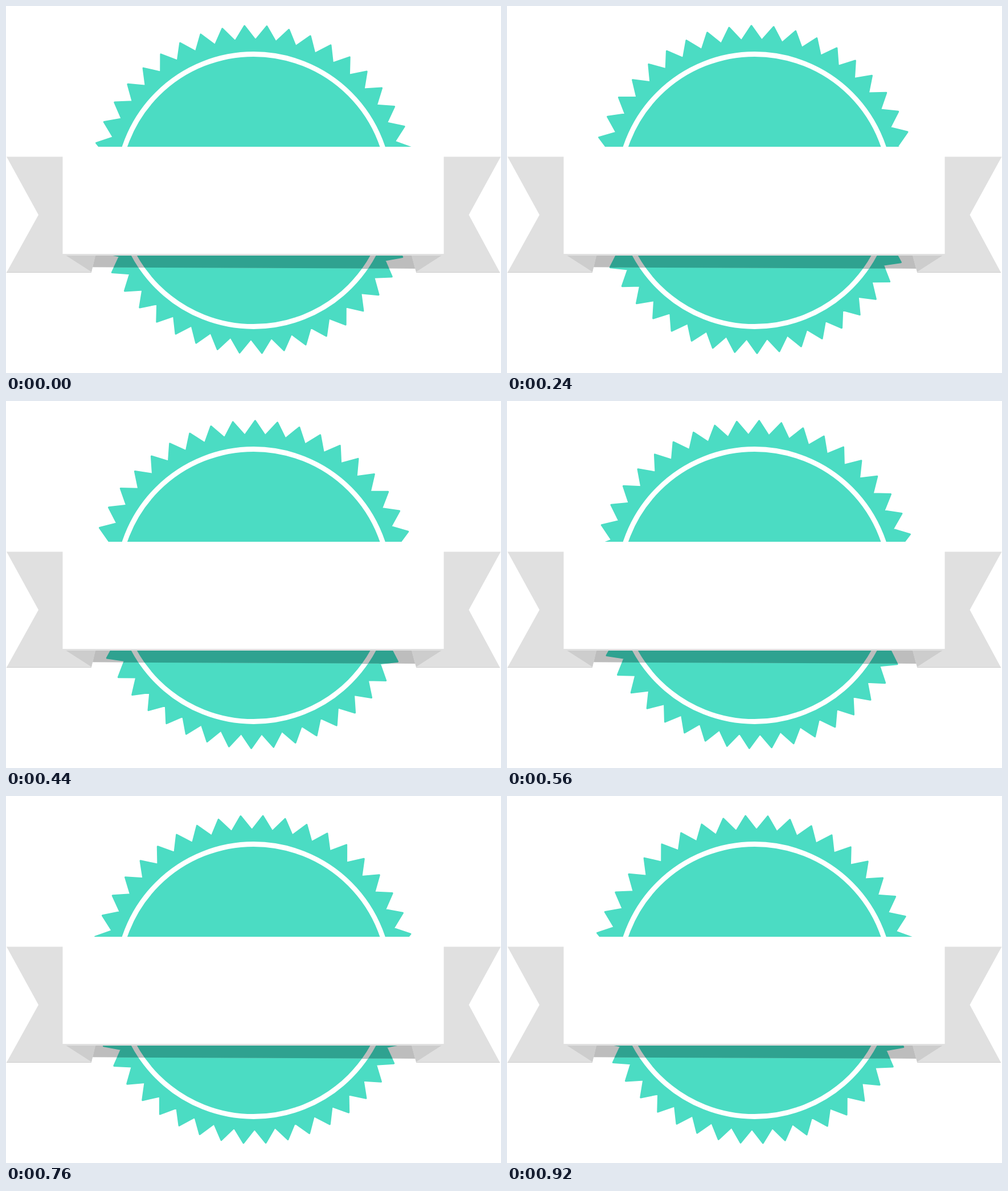
These frames come from a looping animation (869 by 644 pixels, 0.96 s). An HTML page:

```html
<!DOCTYPE html>
<html lang="en">
<head>
<meta charset="utf-8">
<title>Badge with ribbon</title>
<style>
  html, body { margin: 0; width: 100%; height: 100%; overflow: hidden; background: #fff; }
  svg { display: block; width: 100vw; height: 100vh; }
  .badge { fill: #4bdcc3; stroke: #4bdcc3; }
  .shade .badge { fill: #2fa290; stroke: #2fa290; }
  .badge { stroke-width: 3; stroke-linejoin: round; }
  .ring { fill: none; stroke: #fff; stroke-width: 8.8; }
  .shade .ring { stroke: #bdbdbd; }
  .tail { fill: #e0e0e0; }
  .fold { fill: #cdcdcd; }
  .hem { fill: none; stroke: #cfcfcf; stroke-width: 1; }
</style>
</head>
<body>
<svg viewBox="0 0 869 644">
  <defs>
    <path id="shadow" d="M140 437H730V461L140 458.5Z"/>
    <clipPath id="under"><use href="#shadow"/></clipPath>
  </defs>

  <g>
    <path class="badge"/>
    <circle class="ring" cx="434.7" cy="323.5" r="239"/>
  </g>
  <g class="shade" clip-path="url(#under)">
    <use href="#shadow" fill="#bdbdbd"/>
    <path class="badge"/>
    <circle class="ring" cx="434.7" cy="323.5" r="239"/>
  </g>

  <path class="tail" d="M1 264.5H100V437H157L150 467.5H1L57 366.5Z"/>
  <path class="fold" d="M104 437H157L150 466.5Z"/>
  <path class="hem" d="M1 467.5H150"/>
  <path class="tail" d="M868.5 264.5H768V437H712L720 467.5H867L812.5 366.5Z"/>
  <path class="fold" d="M766 437H712L720 466.5Z"/>
  <path class="hem" d="M720 467.5H867"/>

  <rect x="99.5" y="247" width="669" height="188" fill="#fff"/>
  <rect x="99.5" y="435" width="669" height="3" fill="#e0e0e0"/>
</svg>
<script>
  const CX = 434, CY = 322;
  const TEETH = 46, TIP = 287.3, VALLEY = 262;
  const PITCH = 360 / TEETH, START = -3.05;
  const STEP = 40, STEPS = 24;
  const badges = document.querySelectorAll('.badge');

  function point(deg, r) {
    const a = deg * Math.PI / 180;
    return (CX + r * Math.sin(a)).toFixed(2) + ' ' + (CY - r * Math.cos(a)).toFixed(2);
  }

  function starPath(turn) {
    const pts = [];
    for (let i = 0; i < TEETH; i++) {
      const deg = turn + i * PITCH;
      pts.push(point(deg, TIP), point(deg + PITCH / 2, VALLEY));
    }
    return 'M' + pts.join('L') + 'Z';
  }

  // One loop turns the badge by exactly one tooth; first and last steps coincide.
  function draw(ms) {
    const step = Math.floor(ms / STEP) % STEPS;
    const d = starPath(START + PITCH * step / (STEPS - 1));
    badges.forEach(b => b.setAttribute('d', d));
  }

  function tick() {
    draw(performance.now());
    requestAnimationFrame(tick);
  }
  tick();
</script>
</body>
</html>
```
